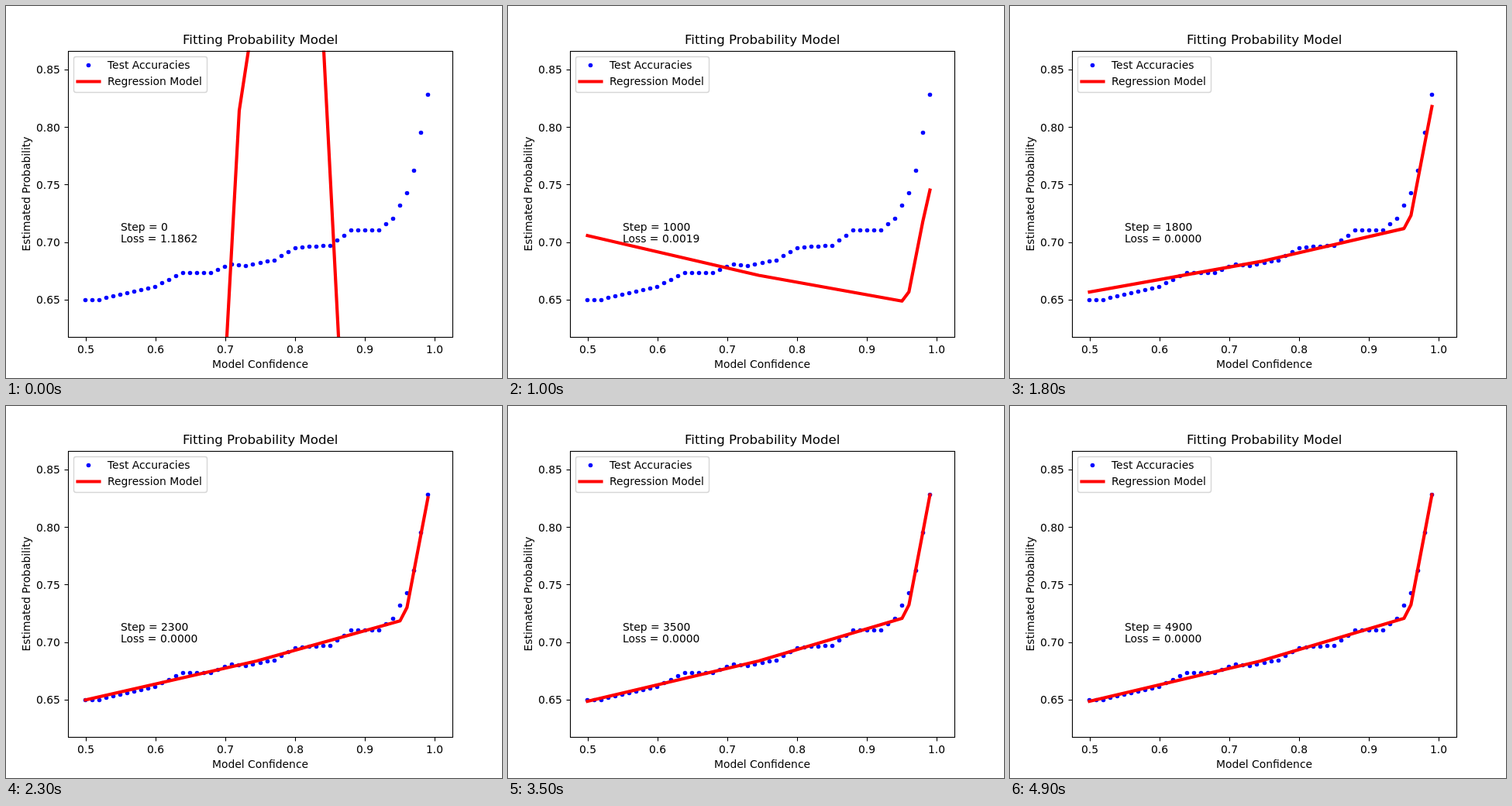
Animation of 640x480 px, one loop 5 s. Source, as an HTML page with a canvas:

```html
<!DOCTYPE html>
<html lang="en">
<head>
<meta charset="utf-8">
<title>Fitting Probability Model</title>
<style>
  html, body { margin: 0; width: 100%; height: 100%; overflow: hidden; background: #fff; }
  canvas { display: block; width: 640px; height: 480px; }
</style>
</head>
<body>
<canvas id="c" width="640" height="480"></canvas>
<script>
const ctx = document.getElementById('c').getContext('2d');
const PT = 100 / 72;
const STEP_MS = 100, STEPS = 50;

const px = x => 102.545 + (x - 0.5) * 901.82;
const py = y => 378.9 - (y - 0.65) * 1484.5;

// Bends of the accuracy curve: [point index, pixel height]
const bends = [
  [0, 379.5], [2, 379], [10, 362], [14, 344], [18, 344], [21, 333], [23, 335], [27, 328],
  [30, 312], [35, 309], [38, 289.5], [42, 289], [44, 274], [46, 241], [47, 212], [49, 114]
];

function accuracyAt(i) {
  const j = Math.max(1, bends.findIndex(b => b[0] >= i));
  const [i0, y0] = bends[j - 1], [i1, y1] = bends[j];
  return y0 + (y1 - y0) * (i - i0) / (i1 - i0);
}

// Model corners: x, resting height, starting gap, then decay time and power.
// Each gap closes as exp(-(k / tau) ^ pow).
const corners = [
  [0.5, 381, -178, 11.46, 2.2],
  [0.745, 329, 714, 3.08],
  [0.95, 274, 1070],
  [0.96, 256.5, 1125],
  [0.98, 162, 1155],
  [0.99, 114.5, 1234]
];
const untrained = [[0.69, 629], [0.72, 135], [0.75, -42], [0.83, -134], [0.87, 566]];

const corner = (k, [x, rest, gap, tau = 4.68, pow = 1.1]) =>
  [x, rest + gap * Math.exp(-((k / tau) ** pow))];
const modelAt = k => k === 0 ? untrained : corners.map(c => corner(k, c));
const lossAt = k => 0.207 * Math.exp(-0.469 * k) + 0.9792 * Math.exp(-3 * k);

function text(str, x, y, align = 0, size = 10) {
  ctx.font = `${size * PT}px "DejaVu Sans", sans-serif`;
  ctx.fillStyle = '#000';
  ctx.fillText(str, Math.round(x - ctx.measureText(str).width * align), y);
}

function dot(x, y) {
  ctx.fillStyle = '#00f';
  ctx.beginPath();
  ctx.arc(Math.floor(x) + 0.5, Math.floor(y) + 0.5, 2 * PT, 0, 7);
  ctx.fill();
}

function line(points, color, width, cap) {
  ctx.strokeStyle = color;
  ctx.lineWidth = width * PT;
  ctx.lineCap = cap;
  ctx.lineJoin = 'round';
  ctx.beginPath();
  points.forEach(([x, y]) => ctx.lineTo(x, y));
  ctx.stroke();
}

const snap = v => Math.round(v) + 0.5;

function axes() {
  for (let i = 5; i <= 10; i++) {
    const x = px(i / 10), sx = snap(x);
    line([[sx, 427.5], [sx, 432.5]], '#000', 0.8, 'butt');
    text((i / 10).toFixed(1), x, 448, 0.5);
  }
  for (let i = 0; i < 5; i++) {
    const v = 0.65 + i * 0.05, y = py(v), sy = snap(y);
    line([[75.5, sy], [80.5, sy]], '#000', 0.8, 'butt');
    text(v.toFixed(2), 70, Math.round(y + 5.4), 1);
  }
  ctx.strokeStyle = '#000';
  ctx.lineWidth = 0.8 * PT;
  ctx.lineJoin = 'miter';
  ctx.strokeRect(80.5, 58.5, 496, 369);

  text('Fitting Probability Model', 328, 49, 0.5, 12);
  text('Model Confidence', 328, 467, 0.5);
  ctx.save();
  ctx.translate(31, 242.4);
  ctx.rotate(-Math.PI / 2);
  text('Estimated Probability', 0, 0, 0.5);
  ctx.restore();
}

function legend() {
  ctx.beginPath();
  ctx.roundRect(87.5, 65.5, 172, 46, 2.8);
  ctx.fillStyle = 'rgba(255,255,255,0.8)';
  ctx.fill();
  ctx.strokeStyle = 'rgba(204,204,204,0.8)';
  ctx.lineWidth = PT;
  ctx.stroke();
  dot(106.4, 76);
  line([[92.5, 97.5], [120.5, 97.5]], '#f00', 3, 'square');
  text('Test Accuracies', 131, 81);
  text('Regression Model', 131, 102);
}

function draw(k) {
  ctx.fillStyle = '#fff';
  ctx.fillRect(0, 0, 640, 480);
  for (let i = 0; i < 50; i++) dot(px(0.5 + i / 100), accuracyAt(i));

  ctx.save();
  ctx.beginPath();
  ctx.rect(80, 57.6, 496, 369.6);
  ctx.clip();
  line(modelAt(k).map(([x, y]) => [px(x), y]), '#f00', 3, 'square');
  ctx.restore();

  axes();
  text(`Step = ${k * 100}`, 148, 290);
  text(`Loss = ${lossAt(k).toFixed(4)}`, 148, 305);
  legend();
}

function tick() {
  draw(Math.floor(performance.now() / STEP_MS) % STEPS);
  requestAnimationFrame(tick);
}
tick();
</script>
</body>
</html>
```
